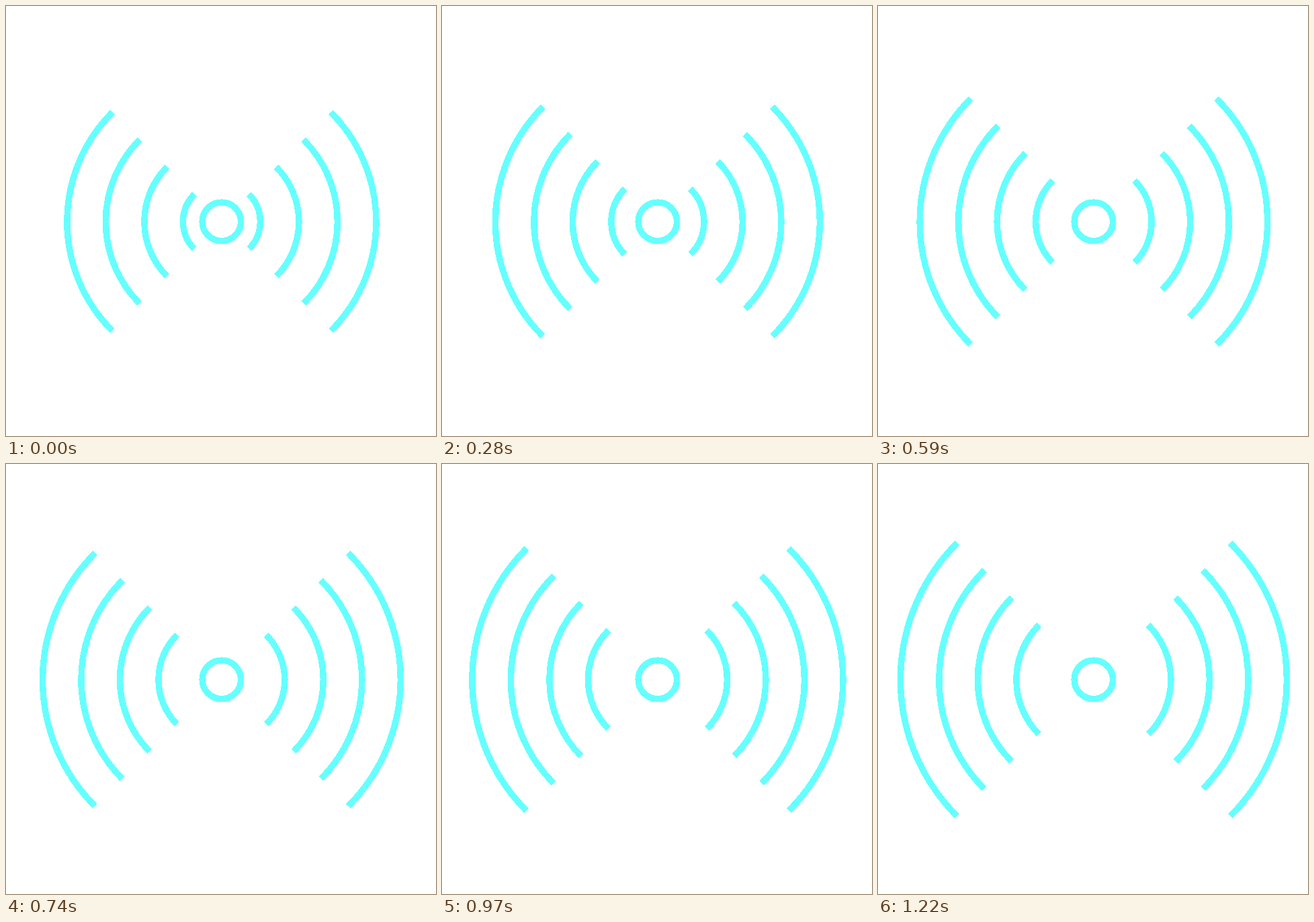
An HTML page for the animation above (1.25 s loop, 640 by 640 pixels).

```html
<!DOCTYPE html>
<html lang="en">
<head>
<meta charset="utf-8">
<title>Signal waves</title>
<style>
  html, body { margin: 0; width: 100%; height: 100%; overflow: hidden; background: #fff; }
  svg { display: block; width: 100vw; height: 100vh; }
  circle, path { fill: none; stroke: #6ff; stroke-width: 9.5; shape-rendering: crispEdges; }
</style>
</head>
<body>
<svg viewBox="0 0 640 640">
  <g transform="translate(320.92 320.92)">
    <circle r="28.75"/>
    <path id="waves"/>
  </g>
</svg>
<script>
  const LOOP = 1250, GAP = 57.5, STEPS = 30, TICK = 40;
  // Moments at which the waves jump outward, in ms
  const times = [0, 50, 100, 150, 200, 250, 300, 350, 380, 430, 480, 530, 560, 590,
    640, 690, 740, 790, 840, 890, 920, 970, 1020, 1070, 1100, 1170, 1220];
  const waves = document.getElementById('waves');
  let shown = -1;

  // Quarter arc opening to the left (side -1) or right (side 1)
  function arc(r, side) {
    const e = r * Math.SQRT1_2, x = side * e;
    return `M${x} ${-e}A${r} ${r} 0 0 ${side > 0 ? 1 : 0} ${x} ${e}`;
  }

  function draw(step) {
    let d = '';
    for (let i = 1; i <= 4; i++) {
      const r = GAP * (i + step / STEPS);
      d += arc(r, -1) + arc(r, 1);
    }
    waves.setAttribute('d', d);
  }

  function frame() {
    const t = performance.now() % LOOP;
    const start = times.filter(s => s <= t).pop();
    const step = Math.min(STEPS, Math.round(start / TICK));
    if (step !== shown) draw(shown = step);
    requestAnimationFrame(frame);
  }
  frame();
</script>
</body>
</html>
```
